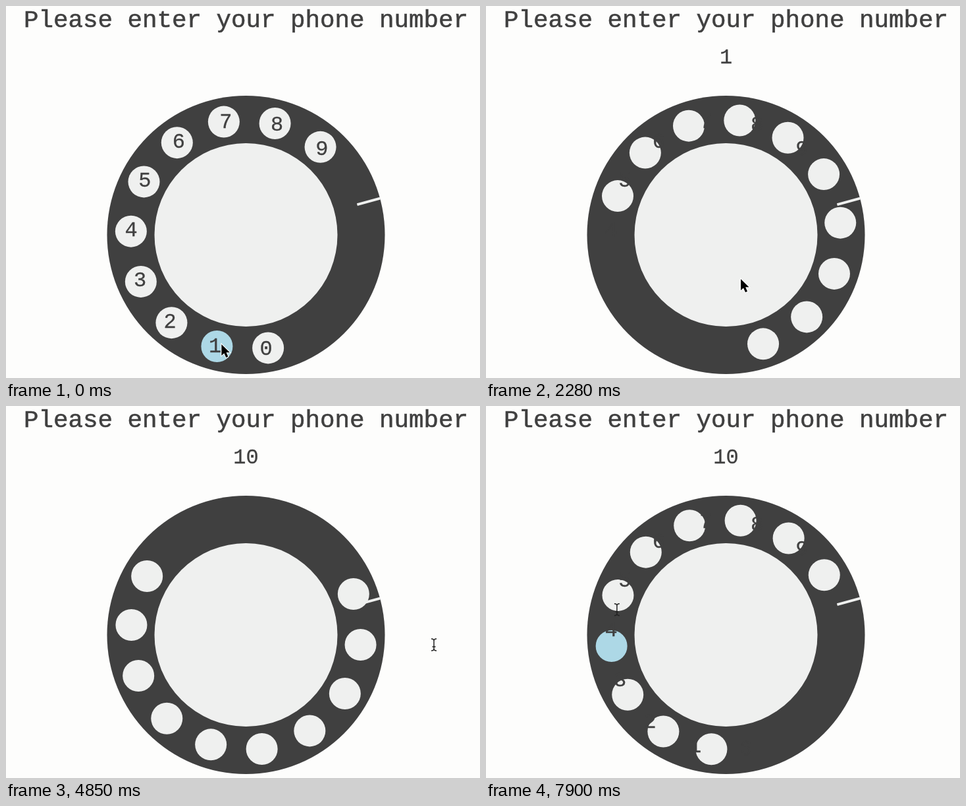
These frames come from a looping animation (720x564 px, 7.99 s). An HTML page with a canvas:

```html
<!DOCTYPE html>
<html lang="en">
<head>
<meta charset="utf-8">
<title>Rotary dial</title>
<style>
  html, body { margin: 0; width: 100%; height: 100%; overflow: hidden; background: #fdfdfc; }
  canvas { display: block; }
</style>
</head>
<body>
<canvas id="stage" width="720" height="564"></canvas>
<script>
const ctx = document.getElementById('stage').getContext('2d');
const LOOP = 7990, TICK = 87, HAND_LEAD = 80;
const CX = 364.5, CY = 347, HOLE_ORBIT = 174.7, HAND_ORBIT = 170;
const DARK = '#404040', PALE = '#eff0ef', ACTIVE = '#add8e6', PAPER = '#fdfdfc';
const FONT = '"Liberation Mono", monospace';
const FIRST_HOLE = 78.9, HOLE_STEP = 360 / 14, STOP_ANGLE = 344.8;

// each turn: hover a hole, pull it to the stop, let the dial run back to rest
const turns = [
  { digit: 1, hover: 0, grab: 463, release: 1260, rest: 3312, bend: 1 },
  { digit: 0, hover: 3410, grab: 3900, release: 4795, rest: 7200, bend: 0.92 },
  { digit: 3, hover: 7560, grab: 7720, release: 8281, rest: 9900, bend: 1 }
];

// [time, x, y] of the free pointer between pulls
const wander = [
  [1260, 540, 300], [2280, 387, 414], [3150, 405, 548], [3600, 402, 515],
  [4795, 600, 320], [4850, 650, 362], [5807, 290, 477], [7640, 208, 408]
];

const holeAngle = digit => FIRST_HOLE + digit * HOLE_STEP;

function pull(turn, t) {
  const f = Math.max(0, (t - turn.grab) / (turn.release - turn.grab));
  return f * f * (STOP_ANGLE - holeAngle(turn.digit));
}

function dialRotation(turn, t) {
  if (t < turn.release) return pull(turn, t);
  const left = Math.max(0, (turn.rest - t) / (turn.rest - turn.release));
  return left ** turn.bend * pull(turn, turn.release);
}

function polar(degrees, radius) {
  const a = degrees * Math.PI / 180;
  return [CX + Math.cos(a) * radius, CY + Math.sin(a) * radius];
}

function pointerAt(turn, t) {
  const pulling = t < turn.release && (t >= turn.grab || turn === turns[0]);
  if (pulling) return polar(holeAngle(turn.digit) - 2 + pull(turn, t + HAND_LEAD), HAND_ORBIT);
  const i = wander.findLastIndex(key => key[0] <= t);
  const [t0, x0, y0] = wander[i];
  const [t1, x1, y1] = wander[i + 1] || [LOOP, x0, y0];
  const f = (t - t0) / (t1 - t0);
  return [x0 + (x1 - x0) * f, y0 + (y1 - y0) * f];
}

function disc([x, y], radius, color) {
  ctx.fillStyle = color;
  ctx.beginPath();
  ctx.arc(x, y, radius, 0, Math.PI * 2);
  ctx.fill();
}

function label(text, x, baseline, size, weight = 0.3) {
  ctx.font = `${size}px ${FONT}`;
  ctx.textAlign = 'center';
  ctx.fillStyle = ctx.strokeStyle = DARK;
  ctx.lineWidth = weight;
  ctx.fillText(text, x, baseline);
  ctx.strokeText(text, x, baseline);
}

function arrow(x, y) {
  ctx.save();
  ctx.translate(x, y);
  const shape = new Path2D('M0 0V17L4 13.5L7 20L10 18.7L7.2 12.3H12.5Z');
  ctx.lineWidth = 2;
  ctx.strokeStyle = '#fff';
  ctx.stroke(shape);
  ctx.fillStyle = '#000';
  ctx.fill(shape);
  ctx.restore();
}

function textBeam(x, y) {
  ctx.save();
  ctx.translate(x, y);
  ctx.lineWidth = 1.5;
  ctx.strokeStyle = '#222';
  ctx.stroke(new Path2D('M-4 -9Q0 -9 0 -6Q0 -9 4 -9M0 -6V6M-4 9Q0 9 0 6Q0 9 4 9M-2.5 3H2.5'));
  ctx.restore();
}

function draw(time) {
  // the picture advances in short steps
  const anchor = time < 4154 ? 540 : 4154;
  const t = anchor + Math.floor((time - anchor) / TICK) * TICK;
  const turn = turns.findLast(({ hover }) => t >= hover) || turns[0];
  const rotation = dialRotation(turn, t);
  const dialled = turns.filter(({ release }) => t >= release).map(({ digit }) => digit).join('');

  ctx.fillStyle = PAPER;
  ctx.fillRect(0, 0, 720, 564);
  label('Please enter your phone number', CX, 32, 37.5, 0.6);
  label(dialled, CX, 87, 32);

  disc([CX, CY], 211, DARK);
  disc([CX, CY], 139, PALE);
  ctx.strokeStyle = PALE;
  ctx.lineWidth = 4;
  ctx.beginPath();
  ctx.moveTo(...polar(STOP_ANGLE, 175));
  ctx.lineTo(...polar(STOP_ANGLE, 211));
  ctx.stroke();

  for (let digit = 0; digit < 10; digit++) {
    const held = digit === turn.digit && t < turn.release;
    disc(polar(holeAngle(digit) + rotation, HOLE_ORBIT), 24, held ? ACTIVE : PALE);
  }
  // digits stay still, and vanish once every hole has moved past them
  for (let digit = 0; digit < 10; digit++) {
    if (digit <= rotation / HOLE_STEP - 1) continue;
    const [x, y] = polar(holeAngle(digit) + 1, HOLE_ORBIT);
    label(digit, x, y + 10, 32);
  }

  const selecting = (t >= 4795 && t < 5050) || t > 7800;
  (selecting ? textBeam : arrow)(...pointerAt(turn, t));
}

const start = performance.now();
function tick() {
  draw((performance.now() - start) % LOOP);
  requestAnimationFrame(tick);
}
tick();
</script>
</body>
</html>
```
